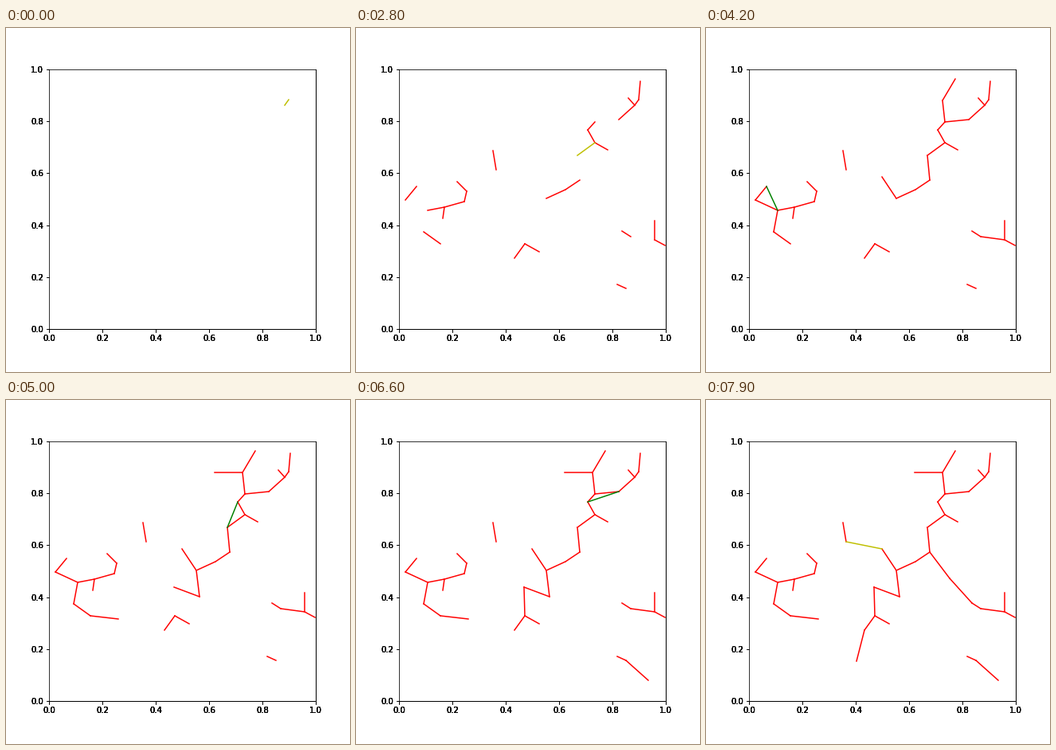
These frames come from a looping animation (432 by 432 pixels, 8000 ms). A matplotlib script:

```python
from itertools import combinations

import matplotlib.pyplot as plt
import numpy as np
from matplotlib.animation import FuncAnimation
from matplotlib.collections import LineCollection

SIZE, DPI, FRAMES = 432, 72, 80
LEFT, BOTTOM, RIGHT, TOP = 0.125, 0.125, 0.9, 0.88
ADDED, REJECTED, KEPT = "y", "g", "r"

# Key points of the graph in whole stage pixels; every edge follows from them.
NODES = np.array([
    # upper right
    (342, 88), (350, 97), (355, 90), (357, 67), (330, 115), (297, 91),
    (313, 64), (262, 91), (300, 118), (291, 128), (300, 144), (316, 153),
    # centre
    (278, 160), (281, 191), (263, 203), (239, 214), (221, 187), (176, 178),
    (172, 154), (243, 247), (211, 235), (212, 271), (230, 281), (199, 289),
    (189, 328),
    # lower right
    (306, 224), (334, 255), (345, 262), (375, 266), (375, 242), (388, 273),
    (328, 322), (339, 327), (367, 352),
    # left
    (62, 216), (76, 199), (90, 229), (111, 225), (109, 239), (136, 218),
    (139, 205), (127, 193), (85, 256), (106, 271), (141, 275),
])


def to_data(px):
    x, y = px.T / SIZE
    return np.column_stack([(x - LEFT) / (RIGHT - LEFT),
                            (1 - y - BOTTOM) / (TOP - BOTTOM)])


def kruskal(points, count):
    """Return the shortest edges in order, each with its accepted flag."""
    def length(edge):
        return np.hypot(*(points[edge[0]] - points[edge[1]]))

    group = list(range(len(points)))
    steps = []
    for a, b in sorted(combinations(range(len(points)), 2), key=length)[:count]:
        ga, gb = group[a], group[b]
        if ga != gb:
            group = [ga if g == gb else g for g in group]
        steps.append(((a, b), ga != gb))
    return steps


points = to_data(NODES)
steps = kruskal(points, FRAMES)

plt.rcParams["text.kerning_factor"] = 6
fig = plt.figure(figsize=(SIZE / DPI, SIZE / DPI), dpi=DPI, facecolor="white")

# Stacked axes give the heavy tick labels.
for layer in range(5):
    ax = fig.add_axes([LEFT, BOTTOM, RIGHT - LEFT, TOP - BOTTOM], label=str(layer))
    ax.patch.set_visible(False)
    ax.set(xlim=(0, 1), ylim=(0, 1))
    ax.tick_params(labelsize=10, labelfontfamily="DejaVu Sans")
    ax.spines[["left", "top"]].set_visible(layer == 0)

edges = LineCollection([], linewidths=1.5, capstyle="projecting")
ax.add_collection(edges, autolim=False)


def draw(i):
    kept = [edge for edge, ok in steps[:i] if ok]
    edge, ok = steps[i]
    edges.set_segments([points[list(e)] for e in kept + [edge]])
    edges.set_color([KEPT] * len(kept) + [ADDED if ok else REJECTED])
    return [edges]


anim = FuncAnimation(fig, draw, frames=FRAMES, init_func=lambda: draw(0),
                     interval=100, repeat=True, repeat_delay=0)
plt.show()
```
